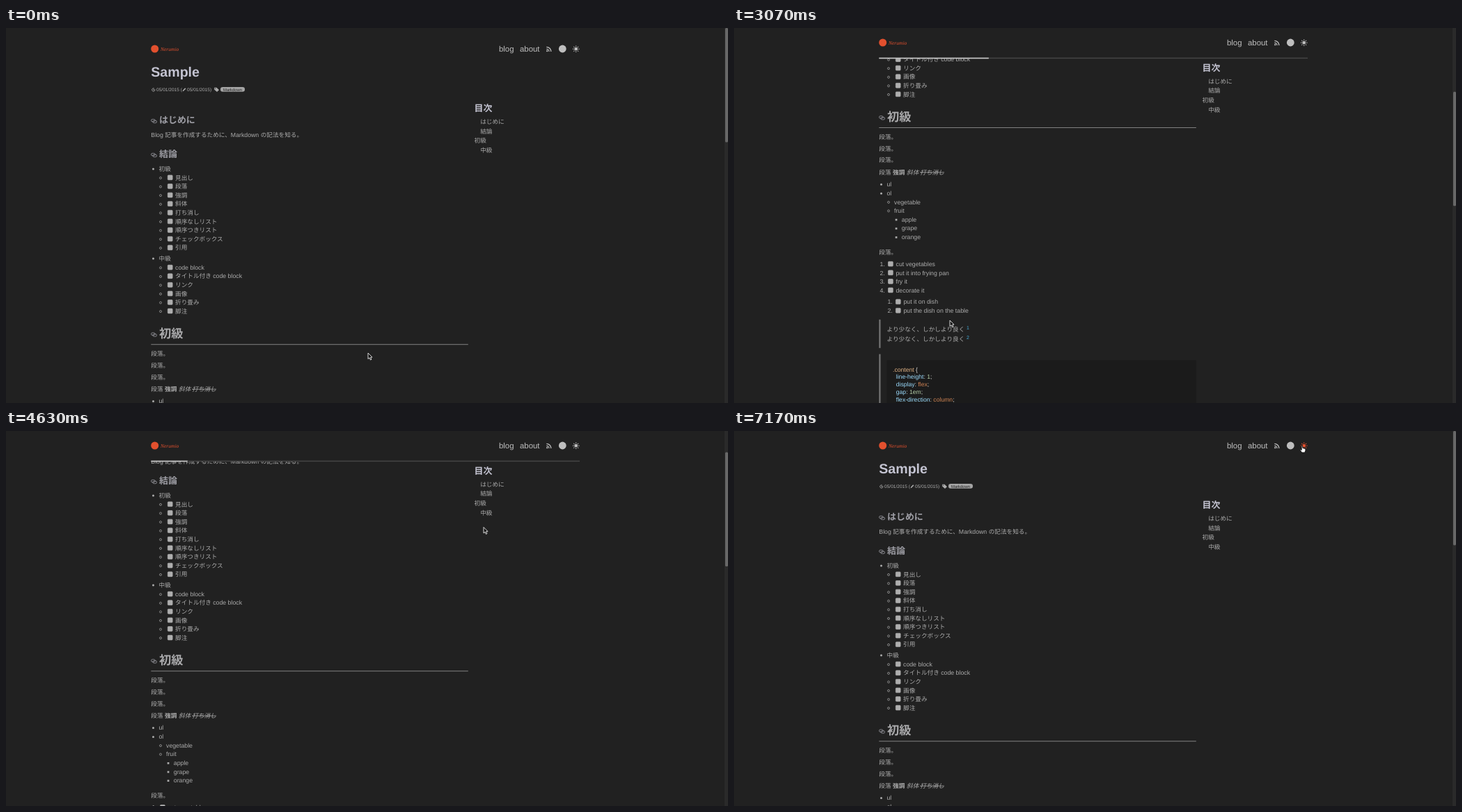
Animation, 1037 px wide and 540 px high, one loop 7560 ms. Source, as an HTML page with a canvas:

```html
<!DOCTYPE html>
<html lang="ja">
<head>
<meta charset="utf-8">
<title>Sample</title>
<style>
html, body { margin: 0; width: 100%; height: 100%; overflow: hidden; background: #212121; }
canvas { display: block; width: 1037px; height: 540px; }
</style>
</head>
<body>
<canvas id="stage"></canvas>
<script>
const W = 1037, H = 540, LOOP = 7560;
const canvas = document.getElementById('stage');
const dpr = window.devicePixelRatio || 1;
canvas.width = W * dpr;
canvas.height = H * dpr;
const ctx = canvas.getContext('2d');
ctx.textRendering = 'geometricPrecision';
const FAMILY = '"Liberation Sans", "Noto Sans CJK JP", "Noto Sans CJK", sans-serif';
const BODY = 8.64;
const ACCENT = '#e2502e';

// [dark, light]
const THEME = {
  bg: [[33, 33, 33], [240, 241, 245]],
  text: [[172, 172, 172], [66, 66, 68]],
  nav: [[190, 190, 190], [52, 52, 54]],
  title: [[196, 196, 210], [38, 38, 40]],
  h2: [[158, 158, 165], [84, 84, 88]],
  h1: [[170, 170, 172], [62, 62, 66]],
  rule: [[140, 140, 140], [96, 96, 98]],
  pill: [[165, 165, 165], [52, 52, 54]],
  pillText: [[33, 33, 33], [240, 241, 245]],
  box: [[174, 174, 174], [246, 246, 248]],
  boxEdge: [[174, 174, 174], [196, 196, 198]],
  thumb: [[104, 104, 104], [158, 158, 158]],
  rail: [[42, 42, 42], [248, 248, 248]],
  track: [[70, 70, 70], [200, 200, 204]],
  fill: [[202, 202, 202], [52, 52, 54]],
  code: [[27, 27, 27], [228, 229, 233]]
};
let C = {};

const clamp = v => Math.max(0, Math.min(1, v));
const mix = (a, b, k) => a + (b - a) * k;
const EASE = {
  lin: u => u,
  in: u => u * u,
  out: u => 1 - (1 - u) * (1 - u),
  io: u => u * u * (3 - 2 * u)
};

// keys: [time, ease into this key, ...values]
function along(keys, t) {
  let prev = keys[0];
  for (const key of keys) {
    if (t < key[0]) {
      if (key === prev) break;
      const u = EASE[key[1]]((t - prev[0]) / (key[0] - prev[0]));
      return prev.slice(2).map((v, i) => mix(v, key[i + 2], u));
    }
    prev = key;
  }
  return prev.slice(2);
}

const POINTER = [
  [30, 'lin', 520, 468], [630, 'io', 269, 427],
  [870, 'lin', 269, 427], [1500, 'io', 211, 430.5],
  [2500, 'lin', 211, 430.5], [2960, 'io', 310, 421],
  [3300, 'lin', 310, 421], [3530, 'in', 447.5, 274.5], [3900, 'out', 686, 138.5],
  [5480, 'lin', 686, 138.5], [5630, 'io', 792, 72],
  [6030, 'lin', 792, 72], [6230, 'io', 816, 21]
];
const SCROLL = [
  [700, 'lin', 0], [1960, 'lin', 0], [2230, 'io', 357.5],
  [2960, 'lin', 357.5], [3070, 'in', 303.2], [3230, 'lin', 130], [3380, 'lin', 0], [3430, 'out', -8]
];
const SCROLL_LATE = [
  [4070, 'lin', 0], [4630, 'io', 101], [5770, 'lin', 101], [6050, 'io', 0]
];

function scrollAt(t) {
  if (t < 700) return -9 * Math.exp(-Math.max(0, t - 30) / 120);
  if (t < 3430) return along(SCROLL, t)[0];
  if (t < 4070) return t > 3930 ? 0 : -8 * Math.exp(-(t - 3430) / 160);
  return along(SCROLL_LATE, t)[0];
}

function setTheme(k) {
  C = {};
  for (const name in THEME) {
    const [d, l] = THEME[name];
    C[name] = `rgb(${d.map((v, i) => Math.round(mix(v, l[i], k)))})`;
  }
}

// Draws text centred on y and returns its right end
function text(str, x, y, color = C.text, size = BODY, style = '') {
  ctx.fillStyle = color;
  for (const run of str.match(/[ -~]+|[^ -~]+/g)) {
    ctx.font = `${style} ${run < '\x7f' ? size * 1.015 : size}px ${FAMILY}`;
    ctx.fillText(run, x, y + size * 0.34);
    x += ctx.measureText(run).width;
  }
  return x;
}

function rect(x, y, w, h, color) {
  ctx.fillStyle = color;
  ctx.fillRect(x, y, w, h);
}

function round(x, y, w, h, r) {
  ctx.beginPath();
  ctx.roundRect(x, y, w, h, r);
}

function dot(x, y, r, color) {
  ctx.fillStyle = color;
  ctx.beginPath();
  ctx.arc(x, y, r, 0, 7);
  ctx.fill();
}

function poly(points, close = true) {
  ctx.beginPath();
  points.forEach(([x, y]) => ctx.lineTo(x, y));
  if (close) ctx.closePath();
}

function pen(color, width) {
  ctx.strokeStyle = color;
  ctx.lineWidth = width;
}

function at(x, y, draw) {
  ctx.save();
  ctx.translate(x, y);
  draw();
  ctx.restore();
}

function linkIcon(x, y) {
  at(x, y, () => {
    pen(C.h2, 0.8);
    round(-4, -2.5, 5.6, 3.5, 1.75);
    ctx.stroke();
    round(-1.6, -0.7, 5.6, 3.5, 1.75);
    ctx.stroke();
  });
}

function heading(str, y, size, color) {
  linkIcon(212.5, y + 1.5);
  text(str, 220, y, color, size, 'bold');
}

function checkbox(x, y) {
  round(x - 3.4, y - 3.7, 6.8, 6.8, 1);
  ctx.fillStyle = C.box;
  ctx.fill();
  pen(C.boxEdge, 0.7);
  ctx.stroke();
}

function ring(y) {
  pen(C.text, 0.7);
  ctx.beginPath();
  ctx.arc(222, y + 0.3, 1.5, 0, 7);
  ctx.stroke();
}

function bullet(str, y) {
  dot(211.5, y + 0.3, 1.5, C.text);
  text(str, 219.5, y);
}

function tasks(items, y, step) {
  items.forEach((item, i) => {
    const row = y + i * step;
    ring(row);
    checkbox(235.7, row);
    text(item, 243, row);
  });
}

function steps(items, x, y) {
  items.forEach((item, i) => {
    const row = y + i * 12.6;
    text(`${i + 1}.`, x, row);
    checkbox(x + 15.4, row);
    text(item, x + 23, row);
  });
}

function meta() {
  const y = 79.7;
  pen(C.text, 0.8);
  ctx.beginPath();
  ctx.arc(211.8, y + 0.3, 2.2, -0.4, 5.2);
  ctx.stroke();
  poly([[211.8, y - 1], [211.8, y + 0.5], [213, y + 0.5]], false);
  ctx.stroke();
  text('05/01/2015 (', 216, y, C.text, 6.5);
  pen(C.text, 1.6);
  poly([[254, y + 2], [257.8, y - 1.8]], false);
  ctx.stroke();
  text('05/01/2015)', 260, y, C.text, 6.5);
  ctx.fillStyle = C.text;
  poly([[299.2, y - 3], [302.4, y - 3], [306, y + 0.6], [303, y + 3.4], [299.2, y]]);
  ctx.fill();
  dot(300.8, y - 1.5, 0.6, C.bg);
  round(308, y - 3.6, 35, 6.6, 3.3);
  ctx.fillStyle = C.pill;
  ctx.fill();
  text('Markdown', 312, y, C.pillText, 5.8);
}

const KEY = '#9cdcfe', VAL = '#cf8354', NUM = '#b5cea8', MARK = '#d4d4d4', SEL = '#dfb184';
const CODE = [
  [['.content ', SEL], ['{', MARK]],
  [['  line-height', KEY], [': ', MARK], ['1', NUM], [';', MARK]],
  [['  display', KEY], [': ', MARK], ['flex', VAL], [';', MARK]],
  [['  gap', KEY], [': ', MARK], ['1em', NUM], [';', MARK]],
  [['  flex-direction', KEY], [': ', MARK], ['column', VAL], [';', MARK]],
  [['  border', KEY], [': ', MARK], ['1px ', NUM], ['solid orange', VAL], [';', MARK]],
  [['}', MARK]],
  [],
  [['.container ', SEL], ['{', MARK]]
];

function article() {
  text('Sample', 208.3, 54.4, C.title, 19.3, 'bold');
  meta();
  heading('はじめに', 123.4, 12.96, C.h2);
  text('Blog 記事を作成するために、Markdown の記法を知る。', 208.3, 145.4);
  heading('結論', 172.4, 12.96, C.h2);
  bullet('初級', 193.7);
  tasks(['見出し', '段落', '強調', '斜体', '打ち消し', '順序なしリスト',
    '順序つきリスト', 'チェックボックス', '引用'], 206.6, 12.62);
  bullet('中級', 322.8);
  tasks(['code block', 'タイトル付き code block', 'リンク', '画像', '折り畳み', '脚注'], 336, 12.56);

  heading('初級', 430.9, 17.28, C.h1);
  rect(208.3, 446.3, 455.5, 0.9, C.rule);
  for (const y of [460.1, 476.9, 493.6, 625.9]) text('段落。', 208.3, y);
  text('段落', 208.3, 511);
  text('強調', 228, 511, C.text, BODY, 'bold');
  text('斜体', 248, 511, C.text, BODY, 'italic');
  text('打ち消し', 267.3, 511, C.text, BODY, 'italic');
  rect(267, 510.7, 35, 0.8, C.text);

  bullet('ul', 528.1);
  bullet('ol', 541.1);
  ['vegetable', 'fruit'].forEach((s, i) => {
    ring(553.8 + i * 12.5);
    text(s, 230, 553.8 + i * 12.5);
  });
  ['apple', 'grape', 'orange'].forEach((s, i) => {
    const y = 579 + i * 12.65;
    rect(231.7, y - 1, 2.7, 2.7, C.text);
    text(s, 240.8, y);
  });
  steps(['cut vegetables', 'put it into frying pan', 'fry it', 'decorate it'], 209.5, 643.2);
  steps(['put it on dish', 'put the dish on the table'], 220.4, 697.7);

  rect(208.3, 723, 2.2, 41, '#757575');
  [1, 2].forEach(n => {
    const y = 723.3 + n * 14;
    text('より少なく、しかしより良く', 219.5, y);
    text(String(n), 334, y - 2.3, '#45acd8', 6.8);
  });
  rect(208.3, 772.8, 2.2, 400, '#757575');
  rect(219.5, 781.5, 444.3, 400, C.code);
  CODE.forEach((line, i) => {
    let x = 228;
    for (const [s, color] of line) x = text(s, x, 794.9 + i * 10.82, color, 8.5);
  });
}

function contents(y) {
  text('目次', 672.6, y - 0.2, C.title, 12.96, 'bold');
  text('はじめに', 681.2, y + 19.2);
  text('結論', 681.2, y + 32.9);
  text('初級', 672.6, y + 46.5);
  text('中級', 681.2, y + 60.1);
}

function themeIcon(moon, color) {
  at(818.7, 21.2, () => {
    if (moon) {
      ctx.fillStyle = color;
      ctx.beginPath();
      ctx.arc(0, 0, 4.4, -0.1, 4.4);
      ctx.quadraticCurveTo(-2, 2, 4.4, -0.4);
      ctx.fill();
      return;
    }
    dot(0, 0, 2.4, color);
    pen(color, 1.1);
    for (let i = 0; i < 8; i++) {
      ctx.rotate(Math.PI / 4);
      poly([[3.3, 0], [4.8, 0]], false);
      ctx.stroke();
    }
  });
}

function header(scroll, light, hover) {
  if (scroll >= 0) rect(0, 0, W, 43, C.bg);
  if (scroll > 0.5) {
    rect(208.3, 42.7, 615.7, 1.4, C.track);
    rect(208.3, 42.7, 615.7 * scroll / 1185, 1.6, C.fill);
  }
  at(0, Math.max(0, -scroll), () => {
    dot(213.7, 21, 5.5, ACCENT);
    ctx.font = 'italic 7.5px "Liberation Serif", serif';
    ctx.fillText('Nerumio', 222, 23.8);
    text('blog', 708, 21.1, C.nav, 11.2);
    text('about', 738, 21.1, C.nav, 11.2);
    dot(777.2, 24.2, 1.1, C.nav);
    pen(C.nav, 1.3);
    for (const r of [3.7, 6.6]) {
      ctx.beginPath();
      ctx.arc(776.3, 25, r, -Math.PI / 2, 0);
      ctx.stroke();
    }
    dot(799.3, 21, 5.4, C.nav);
    themeIcon(light, hover ? ACCENT : C.nav);
  });
}

function status(alpha) {
  if (alpha <= 0) return;
  ctx.globalAlpha = alpha;
  round(-2, 529, 346, 13, 2);
  ctx.fillStyle = '#343434';
  ctx.fill();
  text('https://nostalgic-gates-9846f4.netlify.app/blog/sample/#初級', 2.5, 534.6, '#e4e4e4', 7.1);
  ctx.globalAlpha = 1;
}

function pointer(x, y, hand) {
  at(x, y, () => {
    ctx.lineJoin = 'round';
    if (hand) {
      poly([[-1, 0.2], [0.5, 0.2], [0.9, 3.6], [4.6, 4.5], [5, 6.5], [3.9, 10],
        [-0.4, 10], [-3, 6.2], [-2.4, 5.4], [-0.7, 6.4]]);
      ctx.fillStyle = '#fff';
      pen('#111', 0.9);
    } else {
      poly([[0, 0], [0, 8.6], [2, 6.8], [3.4, 10], [4.9, 9.3], [3.5, 6.3], [6, 6.1]]);
      ctx.fillStyle = '#111';
      pen('#eee', 0.9);
    }
    ctx.fill();
    ctx.stroke();
  });
}

function draw(t) {
  const scroll = scrollAt(t);
  const light = clamp((t - 6250) / 150) - clamp((t - 7000) / 160);
  setTheme(light);
  ctx.setTransform(dpr, 0, 0, dpr, 0, 0);
  rect(0, 0, W, H, C.bg);
  at(0, -scroll, article);
  contents(106.7 - Math.min(scroll, 49.2));
  header(scroll, light > 0.5, t >= 6200);

  rect(1032, 0, 5, H, C.rail);
  round(1033, Math.max(0, scroll) * 0.303, 4, 164.5, 1.5);
  ctx.fillStyle = C.thumb;
  ctx.fill();

  status(clamp((t - 1990) / 80) - clamp((t - 2520) / 120));
  const hand = (t > 1420 && t < 2040) || t >= 6200;
  pointer(...along(POINTER, t), hand);
}

let start;
function frame(now) {
  start ??= now;
  draw((now - start) % LOOP);
  requestAnimationFrame(frame);
}
draw(0);
requestAnimationFrame(frame);
</script>
</body>
</html>
```
